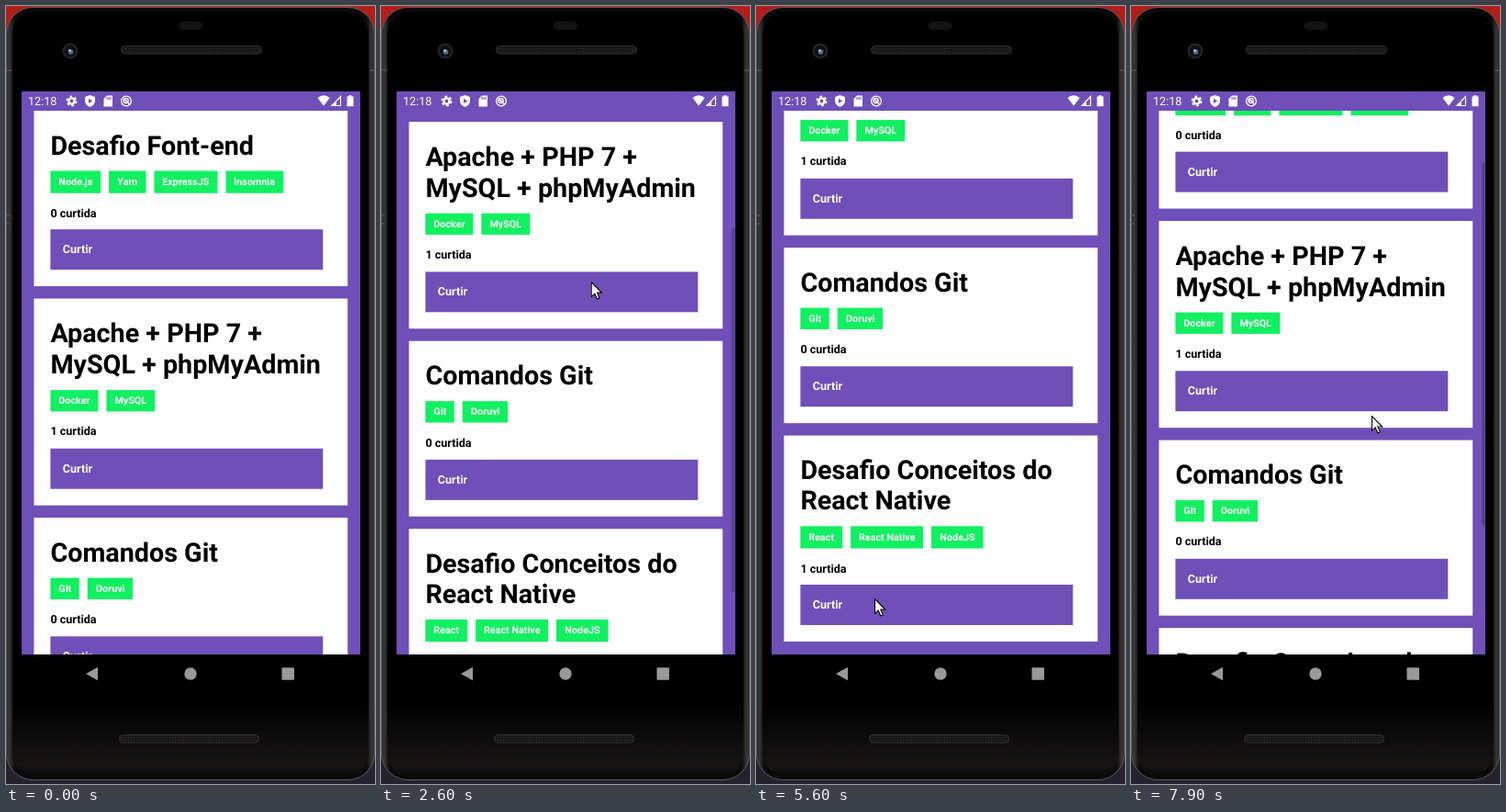
An HTML page that plays this animation: 402x847 px, repeating every 8 s.

```html
<!DOCTYPE html>
<html lang="pt">
<head>
<meta charset="utf-8">
<title>Lista de desafios</title>
<style>
  html, body { margin: 0; width: 100%; height: 100%; overflow: hidden; background: #25222f; }
  body { position: relative; font: 700 14px Roboto, sans-serif; text-rendering: geometricPrecision; }
  svg { position: absolute; left: 0; top: 0; display: block; }

  /* The app is laid out in device units and scaled to the screen */
  #view { position: absolute; left: 17px; top: 114px; width: 411.4px; height: 660px; overflow: hidden;
    transform: scale(.897); transform-origin: 0 0; }
  .card { margin: 0 15px 15px; padding: 20px; background: #fffeff; color: #000; }
  .title { font-size: 32px; line-height: 37.5px; padding: 4px 0 1.5px; white-space: pre; }
  .tags { display: flex; margin: 10px 0 15px; }
  .tag { font-size: 12px; line-height: 25.5px; padding: 1px 10px 0; margin-right: 10px;
    background: #10f060; color: #fff; }
  .likes { line-height: 18.5px; padding-top: 1px; }
  .button { line-height: 48px; padding: 1px 15px 0; margin: 10px 10px 0 0; background: #6f4fb8; color: #fff; }
  #thumb { position: absolute; top: 0; right: 0; width: 4px; height: 441px; background: #000; }
  #glow { position: absolute; left: 50%; top: 617px; width: 1334px; height: 1334px; margin-left: -667px;
    border-radius: 50%; background: #fff; }
</style>
</head>
<body>
<svg width="402" height="847">
  <defs>
    <linearGradient id="rim">
      <stop offset="0" stop-color="#2c2c2c"/><stop offset=".008" stop-color="#363636"/>
      <stop offset=".022" stop-color="#0a0a0a"/><stop offset=".978" stop-color="#0a0a0a"/>
      <stop offset=".992" stop-color="#363636"/><stop offset="1" stop-color="#2c2c2c"/>
    </linearGradient>
    <linearGradient id="chin" x2="0" y2="1">
      <stop offset=".9" stop-color="#000"/><stop offset=".985" stop-color="#171514"/>
      <stop offset="1" stop-color="#0a0a0a"/>
    </linearGradient>
    <pattern id="mesh" width="3" height="3" patternUnits="userSpaceOnUse">
      <rect width="3" height="3" fill="#161616"/><circle cx="1.5" cy="1.5" r=".8" fill="#2b2b2b"/>
    </pattern>
  </defs>

  <rect width="402" height="847" fill="#25222f"/>
  <rect width="402" height="70" fill="#b01f1b"/>
  <rect x=".5" y="1.5" width="401" height="841" rx="29" fill="url(#rim)" stroke="#5c5c5c"/>
  <rect x="7" y="6" width="388" height="833" rx="25" fill="url(#chin)"/>
  <path d="M0 70H6M0 228H4M0 237H4M396 70H402" stroke="#666"/>
  <rect x="188" y="17" width="26" height="9" rx="4.5" fill="#131313"/>
  <circle cx="70" cy="49" r="8.5" fill="#232323"/>
  <circle cx="70" cy="49" r="6" fill="#0a0d12"/>
  <circle cx="70.5" cy="50" r="2.8" fill="#4d6f8f"/>
  <circle cx="69.5" cy="48.5" r="1.2" fill="#c5d5e2"/>
  <rect x="125.5" y="43.5" width="153" height="8.5" rx="4" fill="url(#mesh)" stroke="#303030"/>
  <rect x="123.5" y="793.5" width="152" height="8.5" rx="4" fill="url(#mesh)" stroke="#303030"/>

  <rect x="17" y="93" width="369" height="613" fill="#6f4fb8"/>
  <text x="24" y="108.3" fill="#fff" font-size="12.6" font-weight="400">12:18</text>
  <g fill="#fff">
    <circle cx="71.5" cy="103.5" r="3.1" fill="none" stroke="#fff" stroke-width="2.4"/>
    <circle cx="71.5" cy="103.5" r="5" fill="none" stroke="#fff" stroke-width="2" stroke-dasharray="2.6 2.636"/>
    <path d="M91.5 97L97 99V103Q97 108 91.5 110Q86 108 86 103V99Z"/>
    <path d="M90 100.8V106L94.2 103.4Z" fill="#6f4fb8"/>
    <path d="M110 97.5H116V109.5H106.5V101Z"/>
    <path d="M110 99V102M112 99V102M114 99V102" stroke="#6f4fb8"/>
    <circle cx="131" cy="103.5" r="5.4" fill="none" stroke="#fff" stroke-width="1.3"/>
    <circle cx="130.6" cy="103" r="2.5" fill="none" stroke="#fff" stroke-width="1.4"/>
    <path d="M128.5 101L135 107.5" stroke="#fff" stroke-width="1.4"/>
    <path d="M339.5 100Q346 94.5 352.7 100L346.1 108.8Z"/>
    <path d="M364.5 98.5V108.5H355Z" fill="none" stroke="#fff" stroke-width="1.2"/>
    <path d="M360 103.5V108.5H355Z"/>
    <path d="M373.5 97.3H376.5V98.5H378.5V109.3H371.5V98.5H373.5Z"/>
  </g>
  <g fill="#999">
    <path d="M87 727L100 719.8V734.2Z"/>
    <circle cx="201" cy="727" r="6.7"/>
    <rect x="300.5" y="720.3" width="13.5" height="13.5" rx="1"/>
  </g>
</svg>

<div id="view">
  <div id="list"></div>
  <div id="glow"></div>
  <div id="thumb"></div>
</div>

<svg id="cursor" width="14" height="21">
  <path d="M.5 .5V16.4L4.2 13L6.8 19L9.4 17.9L6.8 12H11.8Z" fill="#fff" stroke="#000" stroke-width="1.1"/>
</svg>

<script>
const LOOP = 8000, STEP = 100, SCALE = 0.897;
const $ = id => document.getElementById(id);

const cards = [
  { title: 'Desafio Font-end', likes: 0, tags: ['Node.js', 'Yarn', 'ExpressJS', 'Insomnia'] },
  { title: 'Apache + PHP 7 +\nMySQL + phpMyAdmin', likes: 1, tags: ['Docker', 'MySQL'] },
  { title: 'Comandos Git', likes: 0, tags: ['Git', 'Doruvi'] },
  { title: 'Desafio Conceitos do\nReact Native', likes: 1, tags: ['React', 'React Native', 'NodeJS'] }
];
const likesText = n => `${n} curtida${n > 1 ? 's' : ''}`;

$('list').innerHTML = cards.map(({ title, likes, tags }) => `
  <div class="card">
    <div class="title">${title}</div>
    <div class="tags">${tags.map(s => `<span class="tag">${s}</span>`).join('')}</div>
    <div class="likes">${likesText(likes)}</div>
    <div class="button">Curtir</div>
  </div>`).join('');
const lastCard = $('list').lastElementChild;
const button = lastCard.querySelector('.button');
const likes = lastCard.querySelector('.likes');

// Progress from 0 to 1 between two times
const ramp = (t, from, to) => Math.min(1, Math.max(0, (t - from) / (to - from)));

// Where the pointer turns or rests: time, x, y
const stops = [
  [600, 326, 389], [700, 282, 397], [800, 282, 397],
  [1300, 246, 509], [2800, 226, 268],
  [3200, 236, 400], [3700, 232, 300], [4400, 228, 272], [4500, 228, 272],
  [5500, 129, 645], [6000, 129, 645],
  [6500, 240, 233], [6600, 240, 233], [7900, 262, 446]
];

function pointer(t) {
  let [, x, y] = stops[0];
  for (let i = 1; i < stops.length; i++) {
    const [from, x0, y0] = stops[i - 1], [to, x1, y1] = stops[i];
    const p = ramp(t, from, to);
    x += (x1 - x0) * p;
    y += (y1 - y0) * p;
  }
  return [x, y];
}

// Two drags up to the end of the list, then one back down
const scrollAt = t =>
  222 * ramp(t, 1300, 2800) + 72 * ramp(t, 3200, 3700) - 209.5 * ramp(t, 6700, 7900);

function draw(t) {
  const scroll = scrollAt(t) / SCALE;
  const [x, y] = pointer(t);
  const bar = ramp(t, 1200, 1400) - ramp(t, 4500, 4800) + ramp(t, 6600, 6700);
  const glow = ramp(t, 3500, 4200) - ramp(t, 4500, 4900);
  const press = ramp(t, 5700, 5900) - ramp(t, 6200, 6500);

  $('list').style.transform = `translateY(${-scroll}px)`;
  $('thumb').style.transform = `translateY(${scroll * 2 / 3}px)`;
  $('thumb').style.opacity = 0.22 * bar;
  $('glow').style.opacity = 0.07 * glow;
  button.style.opacity = 1 - 0.8 * press;
  likes.textContent = likesText(t < 6400 ? 1 : 2);
  $('cursor').style.transform = `translate(${x}px, ${y}px)`;
  $('cursor').style.visibility = t < stops[0][0] ? 'hidden' : 'visible';
}

const start = performance.now();
function tick() {
  const t = (performance.now() - start) % LOOP;
  draw(Math.floor(t / STEP) * STEP);
  requestAnimationFrame(tick);
}
tick();
</script>
</body>
</html>
```
